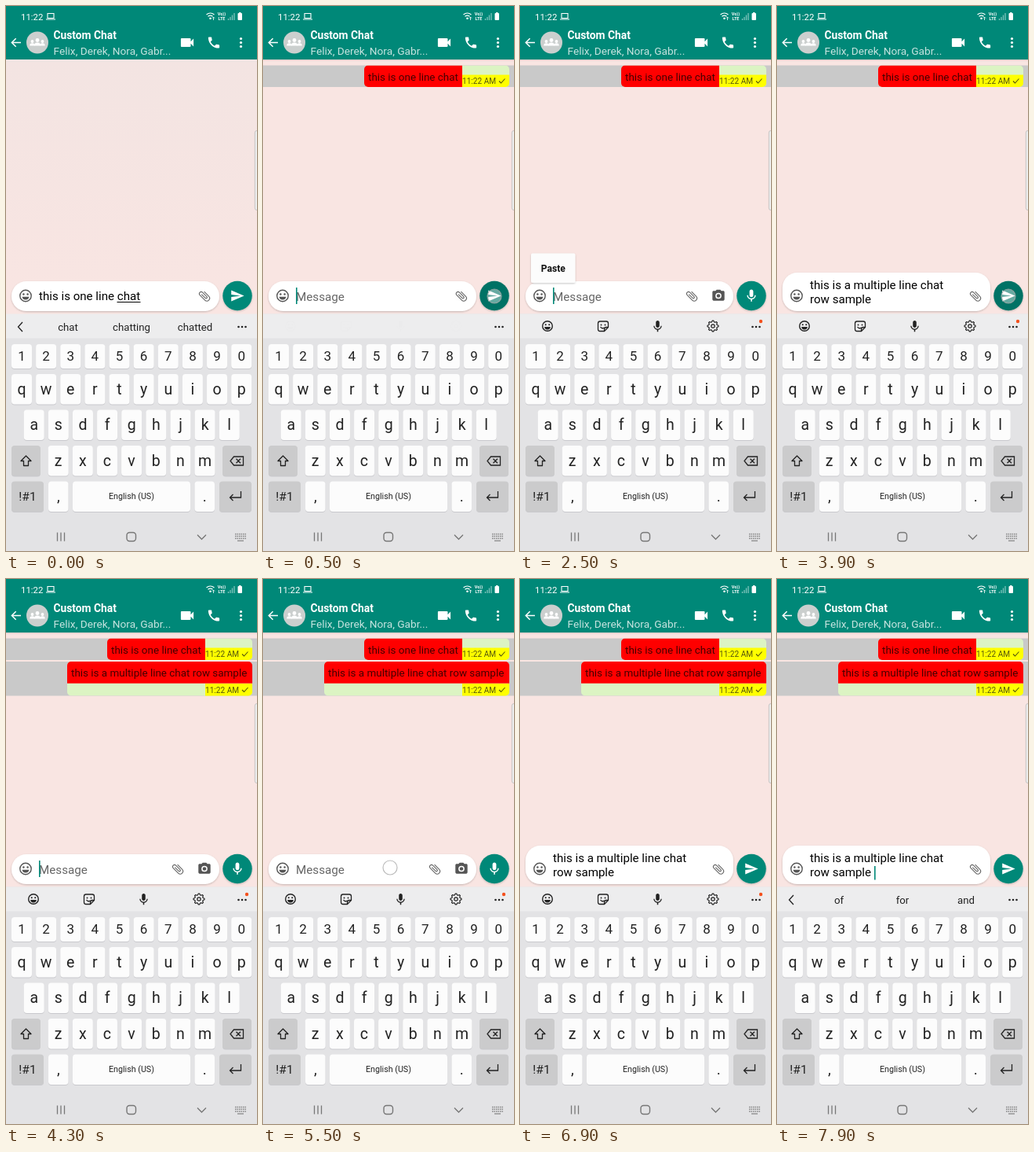
Animation, 320 px wide and 693 px high, one loop 8 s. Source, as an HTML page:

```html
<!DOCTYPE html>
<html lang="en">
<head>
<meta charset="utf-8">
<title>Chat screen</title>
<style>
html, body { margin: 0; width: 100%; height: 100%; overflow: hidden; }
svg { display: block; width: 100%; height: 100%; font-family: Roboto, sans-serif; }
</style>
</head>
<body>
<svg viewBox="0 0 320 693">
  <defs>
    <linearGradient id="dim" x2="0" y2="1"><stop stop-color="#f3e4e2"/><stop offset="1" stop-color="#f9e5e2"/></linearGradient>
    <filter id="shadow" x="-20%" y="-20%" width="140%" height="150%">
      <feDropShadow dx="0" dy="1" stdDeviation="1" flood-opacity=".22"/>
    </filter>
    <clipPath id="bubble1"><rect x="129" y="75.5" width="185" height="27.5" rx="5"/></clipPath>
    <clipPath id="bubble2"><rect x="78" y="105" width="236" height="43.5" rx="5"/></clipPath>
  </defs>
  <g id="back"></g><g id="live"></g>
</svg>
<script>
const LOOP = 8000;
const TEAL = '#008878', INK = '#222', GREY = '#555';
const PASTED = ['this is a multiple line chat', 'row sample'];

// The message field changes at these moments.
const edits = [
  { at: -500, lines: ['this is one line chat'], caret: 172, words: ['chat', 'chatting', 'chatted'] },
  { at: 500, lines: [], caret: 42 },
  { at: 3100, lines: PASTED, caret: 121 },
  { at: 4000, lines: [], caret: 42 },
  { at: 6400, lines: PASTED, caret: 121 },
  { at: 7500, lines: PASTED, caret: 124, words: ['of', 'for', 'and'] }
];
const touches = [
  { from: 300, to: 540, x: 295, y: 369 },
  { from: 1500, to: 1700, x: 182, y: 370 },
  { from: 2000, to: 2350, x: 182, y: 370 },
  { from: 3000, to: 3170, x: 43, y: 335 },
  { from: 3800, to: 4040, x: 295, y: 369 },
  { from: 5500, to: 5850, x: 162, y: 367 },
  { from: 6300, to: 6500, x: 43, y: 335 },
  { from: 7300, to: 7540, x: 160, y: 625 }
];
const popups = [[2280, 3080], [5780, 6380]];

const icons = {
  video: 'M17 10.5V7c0-.55-.45-1-1-1H4c-.55 0-1 .45-1 1v10c0 .55.45 1 1 1h12c.55 0 1-.45 1-1v-3.5l4 4v-11l-4 4z',
  phone: 'M6.6 10.8c1.4 2.8 3.8 5.1 6.6 6.6l2.2-2.2c.3-.3.7-.4 1-.2 1.1.4 2.3.6 3.6.6.6 0 1 .4 1 1V20c0 .6-.4 1-1 1C10.6 21 3 13.4 3 4c0-.6.4-1 1-1h3.5c.6 0 1 .4 1 1 0 1.300.2 2.500.6 3.600.1.300 0 .7-.3 1z',
  send: 'M2 21L23 12 2 3v7l15 2-15 2z',
  mic: 'M12 14c1.700 0 3-1.300 3-3V5c0-1.700-1.300-3-3-3S9 3.300 9 5v6c0 1.700 1.300 3 3 3zm5.300-3c0 3-2.500 5.100-5.300 5.100S6.700 14 6.700 11H5c0 3.400 2.700 6.200 6 6.700V21h2v-3.300c3.300-.5 6-3.300 6-6.700z',
  camera: 'M9 2L7.200 4H4c-1.100 0-2 .9-2 2v12c0 1.100.9 2 2 2h16c1.100 0 2-.9 2-2V6c0-1.100-.9-2-2-2h-3.200L15 2zM12 17a5 5 0 1 1 0-10 5 5 0 0 1 0 10zM12 9a3 3 0 1 0 0 6 3 3 0 0 0 0-6z',
  clip: 'M16.500 6v11.500a4 4 0 0 1-8 0V5a2.500 2.500 0 0 1 5 0v10.500a1 1 0 0 1-2 0V6H10v9.500a2.500 2.500 0 0 0 5 0V5a4 4 0 0 0-8 0v12.500a5.500 5.500 0 0 0 11 0V6z'
};

const clamp = v => Math.max(0, Math.min(1, v));
const rect = (x, y, w, h, r, fill, more = '') =>
  `<rect x="${x}" y="${y}" width="${w}" height="${h}" rx="${r}" fill="${fill}" ${more}/>`;
const circle = (x, y, r, fill, more = '') =>
  `<circle cx="${x}" cy="${y}" r="${r}" fill="${fill}" ${more}/>`;
const stroke = (d, color, width = 1.2, more = '') =>
  `<path d="${d}" fill="none" stroke="${color}" stroke-width="${width}" ${more}/>`;
const text = (x, y, s, size, fill, more = '') =>
  `<text x="${x}" y="${y}" font-size="${size}" fill="${fill}" ${more}>${s}</text>`;
const centered = (x, y, s, size, fill = INK, more = '') =>
  text(x, y, s, size, fill, `text-anchor="middle" ${more}`);
const icon = (name, x, y, scale, fill, turn = 0) =>
  `<path d="${icons[name]}" fill="${fill}" fill-rule="evenodd" transform="translate(${x} ${y}) rotate(${turn}) scale(${scale}) translate(-12 -12)"/>`;
const dots = (points, r, fill) => points.map(([x, y]) => circle(x, y, r, fill)).join('');

function smiley(x, y, r, color) {
  const eye = r * .36;
  return circle(x, y, r, 'none', `stroke="${color}" stroke-width="1.4"`) +
    dots([[x - eye, y - r * .28], [x + eye, y - r * .28]], r * .17, color) +
    `<path d="M${x - r * .6} ${y + r * .16}h${r * 1.2}a${r * .6} ${r * .55} 0 0 1 ${-r * 1.2} 0z" fill="${color}"/>`;
}

function gear(x, y) {
  const points = Array.from({ length: 32 }, (_, i) => {
    const a = (i - .5) / 32 * Math.PI * 2, r = i % 4 < 2 ? 7 : 5.4;
    return `${x + r * Math.cos(a)} ${y + r * Math.sin(a)}`;
  });
  return stroke(`M${points.join('L')}z`, INK, 1.2, 'stroke-linejoin="round"') +
    circle(x, y, 2.2, 'none', `stroke="${INK}" stroke-width="1.2"`);
}

function header() {
  const people = [[33.5, 45, 1.9], [46.5, 45, 1.9], [40, 43.5, 2.4]].map(([x, y, r]) =>
    circle(x, y, r, '#fff') + `<path d="M${x - r * 1.7} ${y + r * 2.9}q0 ${-r * 1.7} ${r * 1.7} ${-r * 1.7}t${r * 1.7} ${r * 1.7}z" fill="#fff"/>`).join('');
  return rect(0, 68, 320, 1.5, 0, '#000', 'opacity=".1"') + rect(0, 0, 320, 68, 0, TEAL) +
    text(19, 17.500, '11:22', 11.400, '#fff') +
    stroke('M53 9.500h8v6h-8zM51 17h12', '#fff', 1.100) +
    stroke('M255.500 11q5-4 10 0M257.500 13.300q3-2.500 6 0', '#fff', 1.200) + circle(260.500, 15.800, 1.300, '#fff') +
    stroke('M264.500 18v-4m-1.500 1.500l1.500-1.500 1.500 1.500', '#fff', .8) +
    centered(275, 12, 'Vo))', 5.500, '#fff', 'font-weight="700"') +
    centered(275, 18, 'LTE', 5.500, '#fff', 'font-weight="700"') +
    stroke('M283.500 18v-2M286 18v-4M288.500 18v-6.500M291 18v-9', '#fff', 1.300, 'opacity=".5"') +
    rect(295.500, 9, 5.500, 9, 1, '#fff') + rect(297, 8, 2.500, 2, .5, '#fff') +
    stroke('M19 46.500H7.500M12.700 41.200L7.400 46.500l5.300 5.300', '#fff', 1.500) +
    circle(40, 46.500, 14, '#cbcfce') + people +
    text(60.500, 41.800, 'Custom Chat', 13.800, '#fff', 'font-weight="700"') +
    text(60.500, 62, 'Felix, Derek, Nora, Gabr...', 13.700, '#c5e3df') +
    icon('video', 231, 46.500, .9, '#fff') + icon('phone', 265, 46.500, .79, '#fff') +
    dots([[299.500, 41.500], [299.500, 46.500], [299.500, 51.500]], 1.600, '#fff');
}

function key(x, y, w, h, label = '', size = 19, fill = '#fcfcfc') {
  return rect(x, y + 1, w, h, 4, '#c9c9cd') + rect(x, y, w, h, 4, fill) +
    centered(x + w / 2, y + h / 2 + size * .34, label, size);
}

function keyboard() {
  const PITCH = 31.130, DARK = '#cbcbcc';
  const row = (letters, x, y, h, size) =>
    [...letters].map((c, i) => key(x + i * PITCH, y, 26, h, c, size)).join('');
  return rect(0, 391.500, 320, 302, 0, '#e3e3e5') +
    row('1234567890', 7, 430, 31, 17) + row('qwertyuiop', 7, 468, 38.500, 19.500) +
    row('asdfghjkl', 22.700, 513.500, 38.500, 19.500) + row('zxcvbnm', 53.700, 559, 38.500, 19.500) +
    key(7, 559, 37, 38.500, '', 19, DARK) + key(276, 559, 37, 38.500, '', 19, DARK) +
    key(7, 604.500, 41, 38.500, '!#1', 15.500, DARK) + key(54, 604.500, 25.500, 38.500, ',', 19) +
    key(85, 604.500, 150, 38.500, 'English (US)', 10.700) +
    key(240.500, 604.500, 25.500, 38.500, '.', 19) + key(272, 604.500, 41, 38.500, '', 19, DARK) +
    stroke('M25.500 572l-6.500 6.500h3.500v6h6v-6h3.500z', INK, 1.300, 'stroke-linejoin="round"') +
    stroke('M290.500 573h12v11h-12l-4.500-5.500zM293.500 575.700l5.500 5.500m0-5.500l-5.500 5.500', INK, 1.300) +
    stroke('M299.500 617v8h-14m4-4l-4 4 4 4', INK, 1.300) +
    stroke('M65.500 669.500v11M70 669.500v11M74.500 669.500v11', '#777', 1.300) +
    rect(154, 669.500, 11.500, 11, 3.500, 'none', 'stroke="#777" stroke-width="1.400"') +
    stroke('M244 672.500l5.500 5.500 5.500-5.500', '#777', 1.400) +
    stroke('M292 671.500h14M292 674.300h14M292 677h14', '#888', 1.500, 'stroke-dasharray="1.600 .9"') +
    stroke('M295 680h8', '#888', 1.300);
}

function stamp(top) {
  return rect(254, top, 60, 16, 0, '#ff0') + text(254, top + 11.700, '11:22 AM', 10.100, '#55550c') +
    stroke(`M301 ${top + 8}l2.500 2.500 5-5.500`, '#55550c', 1.100);
}

function bubble(n, x, top, height, redWidth, message) {
  return rect(0, top, 320, height, 0, '#c9c9c9') + `<g clip-path="url(#bubble${n})">` +
    rect(x, top, 314 - x, height, 0, '#dcf4c3') + rect(x, top, redWidth, 27.700, 0, '#f00') +
    stamp(top + height - 15.500) + '</g>' + text(x + 5, top + 19, message, 13.450, '#450000');
}

function toolbar(words, change) {
  const more = dots([[296.500, 408], [301, 408], [305.500, 408]], 1.300, INK);
  const tools = smiley(35, 407, 6.300, INK) +
    stroke('M102 401h8q2.500 0 2.500 2.500v5l-5 5H102q-2.500 0-2.500-2.500v-7.500q0-2.500 2.500-2.500zM112.500 408.500h-2.500q-2.500 0-2.500 2.500v2.500M102.500 408q2 3 5 1', INK, 1.300) +
    dots([[103.500, 405.500], [108.500, 405.500]], .9, INK) +
    icon('mic', 175.500, 407.500, .75, INK) + gear(246, 407) + circle(307, 401, 2.200, '#f4511e');
  const suggestions = words ? stroke('M21 402l-5.500 6 5.500 6', INK, 1.300) +
    words.map((w, i) => centered(79 + i * 81, 412.500, w, 13.200)).join('') : '';
  return rect(0, 391.500, 320, 31, 0, '#ededee') + more +
    `<g opacity="${change}">${words ? suggestions : tools}</g>`;
}

function composer(edit, caretOn, filled, pressed) {
  const two = edit.lines.length > 1, top = two ? 339 : 350;
  const base = two ? 360 : 374;
  const lines = edit.lines.length
    ? edit.lines.map((s, i) => text(42, base + i * 18, s, 15.100, '#000')).join('')
    : text(42, 374.500, 'Message', 15.200, '#666');
  const underline = edit.lines.length === 1 ? rect(141.500, 376, 30, 1, 0, '#000') : '';
  const swap = Math.abs(filled * 2 - 1);
  return rect(7, top, 265, 388 - top, 19, '#fff', 'filter="url(#shadow)"') +
    smiley(25, 368.500, 7.200, GREY) + lines + underline +
    (caretOn ? rect(two ? edit.caret : 42, two ? 365 : 358, 1.600, two ? 17.500 : 21, 0, TEAL) : '') +
    icon('clip', 219 + 34 * filled, 369, .73, '#666', -45) +
    (filled < 1 ? `<g opacity="${1 - filled}">${icon('camera', 253, 368.500, .77, GREY)}</g>` : '') +
    circle(295, 368.500, 18.700, TEAL, 'filter="url(#shadow)"') +
    circle(295, 368.500, 18.700, '#000', `opacity="${.16 * pressed}"`) +
    (filled > .5 ? icon('send', 295, 368.500, .78 * swap, '#fff') : icon('mic', 295, 368.500, .8 * swap, '#fff'));
}

function popup(opacity) {
  return `<g opacity="${opacity}">` + rect(14, 314.500, 56.500, 37.500, 2, '#fcfcfc', 'filter="url(#shadow)"') +
    centered(42.300, 338, 'Paste', 12.100, '#111', 'font-weight="700"') + '</g>';
}

function scene(t) {
  const index = edits.findLastIndex(e => e.at <= t);
  const edit = edits[index], before = edits[Math.max(0, index - 1)];
  const progress = clamp((t - edit.at) / 180);
  const from = before.lines.length ? 1 : 0, to = edit.lines.length ? 1 : 0;
  const caretOn = Math.floor((t - edit.at) / 500) % 2 === 0;
  const touchLevel = p => t < p.from ? 0 : clamp(1 - (t - p.to) / 140);
  const pressed = Math.max(...touches.filter(p => p.x === 295).map(touchLevel));
  const spacePressed = touchLevel(touches[touches.length - 1]);
  const barChange = edit.words || before.words ? progress : 1;

  let out = t < 500 ? rect(0, 68, 320, 324, 0, 'url(#dim)') : '';
  if (t >= 500) out += bubble(1, 129, 75.500, 27.500, 125, 'this is one line chat');
  if (t >= 4000) out += bubble(2, 78, 105, 43.500, 236, PASTED.join(' '));
  out += rect(317.300, 158.500, 6, 101, 2.500, '#ededed', 'stroke="#bbb" stroke-width=".8"');
  out += composer(edit, caretOn, from + (to - from) * progress, pressed);
  out += toolbar(edit.words, barChange);
  out += rect(85, 604.500, 150, 38.500, 4, '#000', `opacity="${.1 * spacePressed}"`);
  for (const [start, end] of popups) {
    const level = Math.min(clamp((t - start) / 180), clamp(1 - (t - end) / 140));
    if (level) out += popup(level);
  }
  for (const p of touches) {
    const level = touchLevel(p);
    if (level) out += circle(p.x, p.y, 9, '#fff', `fill-opacity=".4" stroke="#aaa" stroke-opacity=".8" stroke-width="1.200" opacity="${level}"`);
  }
  return out;
}

document.getElementById('back').innerHTML =
  rect(0, 0, 320, 693, 0, '#f9e5e2') + header() + keyboard();
const live = document.getElementById('live');
function frame() {
  live.innerHTML = scene(performance.now() % LOOP);
  requestAnimationFrame(frame);
}
frame();
</script>
</body>
</html>
```
